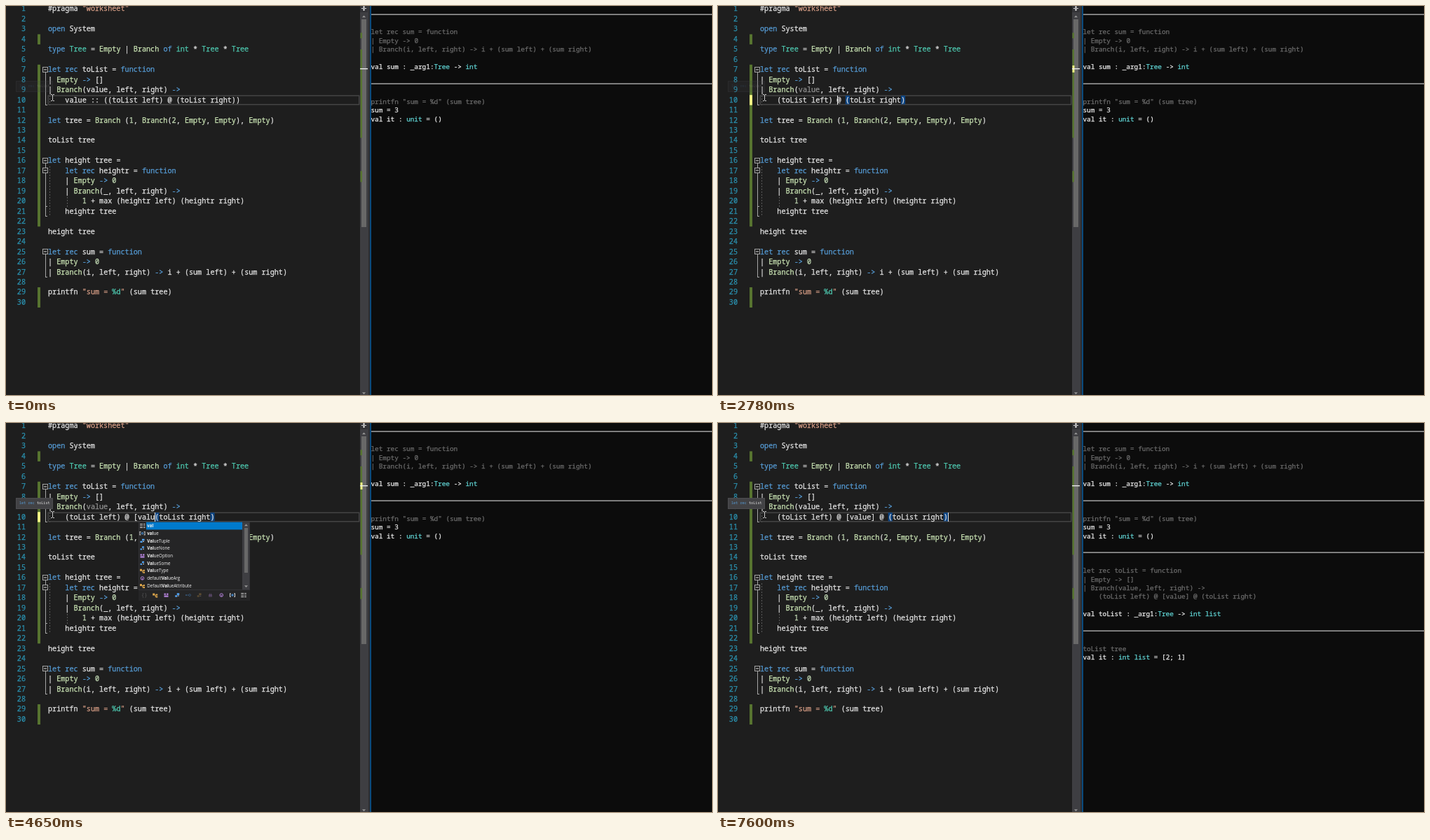
Animation, 1007 px wide and 556 px high, one loop 8 s. Source, as an HTML page with a canvas:

```html
<!DOCTYPE html>
<html lang="en">
<head>
<meta charset="utf-8">
<title>Tree worksheet</title>
<style>
html, body { margin: 0; width: 100%; height: 100%; overflow: hidden; background: #1e1e1e; }
canvas { display: block; }
</style>
</head>
<body>
<canvas id="stage" width="1007" height="556"></canvas>
<script>
const ctx = document.getElementById('stage').getContext('2d');
const LOOP = 8000, ROW = 14.466, COL = 6.09, LEFT = 60;
const MONO = '"Noto Sans Mono", "DejaVu Sans Mono", monospace';
const SANS = '"Open Sans", "Noto Sans", sans-serif';
const C = {
  text: '#e6e6e6', key: '#569cd6', type: '#4ec9b0', union: '#cbe5b5', num: '#c4dcb6',
  str: '#d69d85', line: '#2b91af', dim: '#929292', saved: '#577430', edited: '#eff284',
  fold: '#a5a5a5', bar: '#3e3e42', thumb: '#686868', echo: '#6c6c6c'
};

const CODE = `#pragma "worksheet"

open System

type Tree = Empty | Branch of int * Tree * Tree

let rec toList = function
| Empty -> []
| Branch(value, left, right) ->


let tree = Branch (1, Branch(2, Empty, Empty), Empty)

toList tree

let height tree =
    let rec heightr = function
    | Empty -> 0
    | Branch(_, left, right) ->
        1 + max (heightr left) (heightr right)
    heightr tree

height tree

let rec sum = function
| Empty -> 0
| Branch(i, left, right) -> i + (sum left) + (sum right)

printfn "sum = %d" (sum tree)
`.split('\n');

// Edits of line 10: time, text, caret column, highlighted bracket columns
const L = '(toList left)', R = '(toList right)', PAIR = `${L} @ ${R}`;
const EDITS = [
  [0, `value :: (${PAIR})`, 4, []],
  [620, `:: (${PAIR})`, 4, []],
  [1010, `(${PAIR})`, 4, []],
  [1320, `(${PAIR})`, 4, [4, 35]],
  [1710, `${PAIR})`, 4, [4, 16]],
  [2030, `${PAIR})`, 35, []],
  [2200, PAIR, 34, [20, 33]],
  [2320, PAIR, 28, []],
  [2480, PAIR, 21, []],
  [2630, PAIR, 20, [20, 33]],
  [2780, PAIR, 18, [20, 33]],
  [3010, PAIR, 18, []],
  [3200, PAIR, 20, []],
  [3400, PAIR, 20, [20, 33]],
  [3700, `${L} @ [${R}`, 21, [21, 34]],
  [4100, `${L} @ [v${R}`, 22, [22, 35]],
  [4330, `${L} @ [va${R}`, 23, [23, 36]],
  [4490, `${L} @ [val${R}`, 24, [24, 37]],
  [4650, `${L} @ [valu${R}`, 25, [25, 38]],
  [4720, `${L} @ [value${R}`, 26, [26, 39]],
  [5110, `${L} @ [value]${R}`, 27, [27, 40]],
  [5340, `${L} @ [value]${R}`, 27, [20, 26, 27, 40]],
  [5910, `${L} @ [value] ${R}`, 28, [28, 41]],
  [6070, `${L} @ [value] @${R}`, 29, [29, 42]],
  [6240, `${L} @ [value] @ ${R}`, 30, [30, 43]],
  [6810, `${L} @ [value] @ ${R}`, 44, [30, 43]]
];

// Completion lists: icon letter, then label
const MATCHES = ['v value', 's ValueTuple', 'd ValueNone', 'e ValueOption', 'd ValueSome',
  'c ValueType', 'm defaultValueArg', 'c DefaultValueAttribute', 'c KeyValuePair'];
const LISTS = [
  { at: 4170, query: 'v', pick: 3, thumb: 6, off: '',
    items: ['v value', 'c voidptr', 'o voption', 'k val', 'k void', 's ValueTuple', 'd ValueNone', 'e ValueOption', 'd ValueSome'] },
  { at: 4490, query: 'val', pick: 0, thumb: 64, off: '0456', items: ['k val', ...MATCHES.slice(0, 8)] },
  { at: 4720, query: 'valu', pick: 0, thumb: 64, off: '0456', items: MATCHES },
  { at: 4800, query: 'value', pick: 0, thumb: 64, off: '0456', items: MATCHES }
];

const latest = (list, t, time) => list.filter(e => time(e) <= t).pop();
const mid = n => 4 + (n - 1) * ROW;

function rect(x, y, w, h, color) {
  ctx.fillStyle = color;
  ctx.fillRect(x, y, w, h);
}
function frame(x, y, w, h, color) {
  ctx.strokeStyle = color;
  ctx.lineWidth = 1;
  ctx.strokeRect(x + .5, y + .5, w - 1, h - 1);
}
function put(s, x, y, color) {
  ctx.fillStyle = color;
  ctx.fillText(s, x, y);
}
// Code is set a touch heavier than the regular weight
function putCode(s, x, y, color) {
  put(s, x, y, color);
  ctx.strokeStyle = color;
  ctx.lineWidth = .25;
  ctx.strokeText(s, x, y);
}
function arrow(x, y, dir) {
  ctx.fillStyle = '#999';
  ctx.beginPath();
  ctx.moveTo(x - 2.5, y + dir * -1.3);
  ctx.lineTo(x + 2.5, y + dir * -1.3);
  ctx.lineTo(x, y + dir * 1.5);
  ctx.fill();
}

function colorOf(word) {
  if (/^(open|type|of|let|rec|function|->)$/.test(word)) return C.key;
  if (/^(Tree|int)$/.test(word)) return C.type;
  if (/^(Empty|Branch)$/.test(word)) return C.union;
  if (/^\d/.test(word)) return C.num;
  if (word[0] === '"') return C.str;
  return C.text;
}
function tokens(s, x, y, col, pick) {
  for (const m of s.matchAll(/"|%d|->|\w+|[^\w\s]/g))
    putCode(m[0], x + m.index * col, y, pick(m[0], (s.slice(0, m.index).split('"').length - 1) % 2 === 1));
}

function fold(n, last, ticks = [last]) {
  const y = Math.round(mid(n)), end = Math.round(mid(last) + 7);
  rect(56, y + 4, 1, end - y - 4, C.fold);
  for (const k of ticks) rect(56, Math.round(mid(k) + 7), 3, 1, C.fold);
}
function foldBox(n) {
  const y = Math.round(mid(n));
  rect(52, y - 4, 8, 8, '#1e1e1e');
  frame(52, y - 4, 8, 8, C.fold);
  rect(54, y - .5, 4, 1, '#dcdcdc');
}
function guide(x, from, to) {
  for (let y = mid(from) - 6; y < mid(to) + 7; y += 4) rect(x, Math.round(y), 1, 2, '#5a5a5a');
}

function editor(t, edit) {
  const [, text, caret, marks] = edit;
  const dirty = t >= 620 && t < 7100;
  const unused = t >= 1550 && t < 6500;
  const rechecking = t >= 5340 && t < 7100;
  rect(0, 0, 505, 556, '#1e1e1e');

  for (const [a, b] of [[4, 4], [7, 22], [29, 30]])
    rect(45, mid(a) - 7, 4, (b - a + 1) * ROW, C.saved);
  if (dirty) rect(45, mid(10) - 7, 4, ROW, C.edited);

  fold(7, 10);
  fold(16, 21, [20, 21]);
  fold(25, 27);
  [7, 16, 17, 25].forEach(foldBox);
  guide(62, 10, 10);
  guide(62, 17, 21);
  guide(87, 20, 20);

  ctx.strokeStyle = '#464646';
  ctx.lineWidth = 1.5;
  ctx.strokeRect(60.2, 128.2, 443.5, 12.6);
  for (const c of marks) rect(LEFT + c * COL, 128, COL, 12.5, '#0e4583');

  ctx.font = `10.15px ${MONO}`;
  CODE.forEach((s, i) => {
    const n = i + 1, y = mid(n) + 3.4, num = String(n);
    putCode(num, 28 - num.length * COL, y, C.line);
    tokens(n === 10 ? '    ' + text : s, LEFT, y, COL, (w, quoted) => {
      if (w === '%d') return rechecking ? C.str : C.type;
      if (quoted) return C.str;
      return n === 9 && w === 'value' && unused ? C.dim : colorOf(w);
    });
  });
  if (t >= 300) rect(Math.round(LEFT + caret * COL), 128, 1, 13, '#e6e6e6');
}

function tooltip(t) {
  ctx.globalAlpha = t < 3010 ? .16 : t < 3100 ? .4 : t < 3250 ? .7 : 1;
  rect(14, 107, 53, 16, '#424245');
  frame(14, 107, 53, 16, '#4d4d50');
  ctx.font = `5.2px ${MONO}`;
  put('let rec', 19, 116, C.key);
  put('toList', 44, 116, C.text);
  ctx.globalAlpha = 1;
}

function pointer() {
  rect(66, 127, 1, 8, '#c8c8c8');
  for (const y of [126, 135])
    for (const x of [64, 67]) rect(x, y, 2, 1, '#c8c8c8');
}

function scrollbar(t) {
  rect(505, 0, 12, 556, C.bar);
  rect(517, 0, 2, 556, '#2d2d30');
  rect(507, 19, 7, 297, C.thumb);
  rect(505, 0, 11, 9, '#333337');
  rect(507, 3, 7, 1, '#ddd');
  rect(510, 0, 1, 7, '#ddd');
  rect(509, 1, 3, 1, '#ddd');
  rect(509, 5, 3, 1, '#ddd');
  arrow(510.5, 15, -1);
  arrow(510.5, 553.5, 1);
  const spot = n => 62 + (n - 7) * 7.9;
  for (const [a, b] of [[4, 4], [7, 22], [29, 30]])
    rect(505.5, spot(a), 2.5, (b - a + 1) * 7.9, C.saved);
  if (t >= 620 && t < 7100) rect(505.5, 85, 3, 10, C.edited);
  rect(505, 89, 11, 1.4, '#e8e8e8');
}

function icon(kind, x, y) {
  const blue = '#55aaff', gold = '#e0a84c', lilac = '#b180d7', white = '#d0d0d0';
  const box = (dx, dy, w, h, c) => rect(x + dx, y + dy, w, h, c);
  const ring = (dx, dy, r, c) => {
    ctx.strokeStyle = c;
    ctx.lineWidth = 1;
    ctx.beginPath();
    ctx.arc(x + dx, y + dy, r, 0, 7);
    ctx.stroke();
  };
  if (kind === 'v') {
    box(-4, -2.5, 1, 5, white); box(3, -2.5, 1, 5, white);
    box(-4, -2.5, 2, .8, white); box(2, -2.5, 2, .8, white);
    box(-4, 1.8, 2, .8, white); box(2, 1.8, 2, .8, white);
    ring(0, 0, 1.2, blue);
  } else if (kind === 'k') {
    for (const dy of [-3, -.5, 2]) { box(-3.5, dy, 4, 1, white); box(1.5, dy, 2.5, 1, white); }
  } else if (kind === 'c') {
    box(-3.5, -2.5, 3, 3, gold); box(-.5, -.5, 2, 1, gold);
    box(1, -1.5, 2.5, 2, gold); box(1, 1.5, 2.5, 2, gold); box(0, 0, 1, 3, gold);
  } else if (kind === 'e') {
    box(-3, -2.5, 2.5, 2.3, lilac); box(.5, -2.5, 2.5, 2.3, lilac); box(-3, .5, 6, 2.3, lilac);
  } else if (kind === 's' || kind === 'd') {
    const k = kind === 's' ? 1 : .85;
    box(-.5, -2.7, 3.5 * k, 2.5 * k, blue); box(-3, .3, 3 * k, 2.3 * k, blue);
    box(.5, .5, 2, 1, white);
  } else if (kind === 'o') {
    box(-.5, -2.7, 3.3, 2.7, gold); box(-3, .3, 2.8, 2.3, gold); box(.5, .8, 2, 1, white);
  } else if (kind === 'i') {
    ring(2, 0, 1.5, blue); box(-4, -1, 2, 2, blue); box(-2, -.5, 2.5, 1, blue);
  } else if (kind === 'm') {
    ring(0, 0, 2.3, lilac); box(-.5, -.5, 1, 2.5, lilac);
  } else if (kind === 'n') {
    box(-2.5, -1, 5, 3.5, lilac); box(-1.5, -2.5, 1, 2, lilac); box(.5, -2.5, 1, 2, lilac);
  } else {
    ctx.font = `7px ${MONO}`;
    put('{}', x - 4, y + 2.3, white);
  }
}

function label(s, query, x, y) {
  const at = s.toLowerCase().indexOf(query), end = at + query.length;
  for (const [part, weight] of [[s.slice(0, at), 400], [s.slice(at, end), 700], [s.slice(end), 400]]) {
    ctx.font = `${weight} 6.2px ${SANS}`;
    put(part, x, y, '#f1f1f1');
    x += ctx.measureText(part).width;
  }
}

function popup(list) {
  rect(189, 141, 159, 113, '#252526');
  frame(189, 141, 159, 98, '#333337');
  rect(337, 142, 10, 96, C.bar);
  rect(340, 150, 5, list.thumb, C.thumb);
  arrow(342.5, 146, -1);
  arrow(342.5, 233.5, 1);
  list.items.forEach((item, i) => {
    const y = 147 + i * 10.7;
    if (i === list.pick) rect(200, y - 5.3, 137, 10.7, '#007acc');
    icon(item[0], 194.5, y);
    label(item.slice(2), list.query, 201.3, y + 2.2);
  });
  [...'bcesionmvk'].forEach((kind, i) => {
    ctx.globalAlpha = list.off.includes(i) ? .3 : 1;
    icon(kind, 197 + i * 15.75, 246);
  });
  ctx.globalAlpha = 1;
}

function output(t) {
  const X = 520.5, W = 5.625, STEP = 12.4;
  const resultColor = w => /^(Tree|int|unit|list)$/.test(w) ? '#61d6d6' : '#f0f0f0';
  // Lines that start with ~ are echoed input
  const block = (rule, y, lines) => {
    rect(520, rule - .5, 487, 1.2, '#c8c8c8');
    lines.forEach((s, i) => {
      const echo = s[0] === '~';
      tokens(echo ? s.slice(1) : s, X, y + i * STEP + 3.1, W, echo ? () => C.echo : resultColor);
    });
  };
  rect(519, 0, 488, 556, '#0c0c0c');
  ctx.font = `9.375px ${MONO}`;
  block(12, 37.3, ['~let rec sum = function', '~| Empty -> 0',
    '~| Branch(i, left, right) -> i + (sum left) + (sum right)', '', 'val sum : _arg1:Tree -> int']);
  block(111, 136.6, ['~printfn "sum = %d" (sum tree)', 'sum = 3', 'val it : unit = ()']);
  if (t >= 7350) block(185, 211, ['~let rec toList = function', '~| Empty -> []',
    '~| Branch(value, left, right) ->', '~    (toList left) @ [value] @ (toList right)', '',
    'val toList : _arg1:Tree -> int list']);
  if (t >= 7600) block(297, 322.5, ['~toList tree', 'val it : int list = [2; 1]']);
  rect(519, 0, 2, 556, '#0a4a7d');
}

function draw(now) {
  const t = now % LOOP;
  editor(t, latest(EDITS, t, e => e[0]));
  tooltip(t);
  pointer();
  const list = latest(LISTS, t, e => e.at);
  if (list && t < 5110) popup(list);
  scrollbar(t);
  output(t);
}

const start = performance.now();
function tick() {
  draw(performance.now() - start);
  requestAnimationFrame(tick);
}
tick();
</script>
</body>
</html>
```
